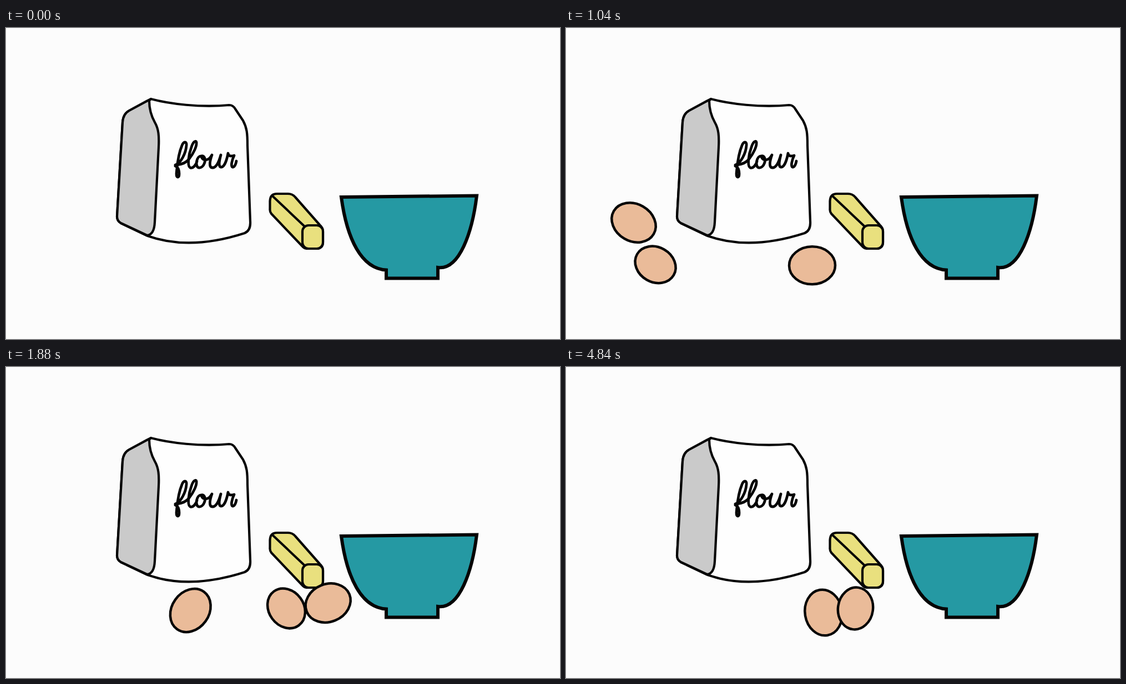
An HTML page that plays this animation: 998x561 px, repeating every 5 s.

```html
<!DOCTYPE html>
<html lang="en">
<head>
<meta charset="utf-8">
<title>Baking ingredients</title>
<style>
  html, body { margin: 0; height: 100%; overflow: hidden; background: #fcfcfc; }
  svg { display: block; width: 100%; height: 100%; }
  path, rect, ellipse { stroke: #050505; stroke-width: 4.2; stroke-linejoin: round; stroke-linecap: round; }
  .line { fill: none; }
  .butter { fill: #e9e07e; }
  .egg { fill: #eabb99; stroke-width: 4.5; }
</style>
</head>
<body>
<svg viewBox="0 0 998 561">
  <g id="bag">
    <path fill="#fefefe" d="M261 128C295 137 350 144 402 139Q409 139 413 146L427 167C434 180 435 190 435 212L440 349Q441 365 430 370C365 391 305 393 255 375L207 352Q200 348 200 340L210 170Q211 155 222 149Z"/>
    <path fill="#cacaca" d="M261 128L222 149Q211 155 210 170L200 340Q200 348 207 352L254 374Q267 373 268 350L275 215C276 195 275 182 268 170Q258 152 258 131Z"/>
    <path class="line" style="stroke-width:4.8" d="M305 247C315 244 324 226 325 212C326 204 320 204 317 212C311 226 308 250 307 263C307 271 312 271 312 263C312 256 310 251 305 249M307 247C318 246 325 243 330 236C338 226 344 213 343 206C342 202 337 205 334 215C329 228 326 249 332 252C337 254 342 247 344 241M353 231C343 229 340 250 347 252C356 254 363 236 355 231C350 229 352 238 360 238C366 237 368 234 371 229C367 240 365 252 372 252C379 252 384 240 387 229C384 240 382 251 388 251C394 250 398 237 400 226C401 231 404 232 411 230C407 238 404 251 409 251C412 250 414 246 415 240"/>
  </g>
  <g id="butter">
    <path class="butter" d="M475.500 312Q476 299 488 299H508Q516 299 521 305L565 355Q571 360 571 367V386Q571 398 559 398H541Q538 398 535 395L478 335Q475 331 475.500 326Z"/>
    <path class="line" d="M480 303L538 358"/>
    <rect class="butter" x="534" y="356" width="37" height="42" rx="11"/>
  </g>
  <path id="bowl" fill="#2599a3" style="stroke-width:6;stroke-linejoin:miter" d="M604 305L848 302.500C840 368 817 437 778 432V451.500H685V436.500C640 434 614 380 604 305Z"/>
  <g id="eggs"></g>
</svg>
<script>
const LOOP = 5000, STEP = 40, SHOW = 40, LEAVE = 4840;
const SPEED = 0.54, RAMP_X = 160, FLOOR = 434, FIRST = 515, LAG = 523;

// Back to front. Each egg slides from its perch to a hold point, rolls to `stop`,
// then is nudged to `rest` during `settle`.
const eggs = [
  { order: 2, rx: 41.5, ry: 33.5, tilt: 30, spin: 1.6, twist: -76, end: LOOP,
    perch: [151, 296], hold: [122, 351], stop: 452, rest: [464, 443], settle: [2240, 2640] },
  { order: 1, rx: 38, ry: 31.5, tilt: 28, spin: 1.64, twist: 17, end: LOOP,
    perch: [110, 316], hold: [111, 333], stop: 505, rest: [521.5, 435.5], settle: [2120, 2600] },
  { order: 0, rx: 41.5, ry: 34, tilt: 5, spin: 1.25, twist: -9, end: LEAVE,
    perch: [119, 345], hold: [119, 345], stop: 605, rest: [587, 425.5], settle: [1560, 2240] },
];

for (const egg of eggs) {
  egg.node = document.createElementNS("http://www.w3.org/2000/svg", "ellipse");
  egg.node.setAttribute("class", "egg");
  egg.node.setAttribute("rx", egg.rx);
  egg.node.setAttribute("ry", egg.ry);
  document.getElementById("eggs").append(egg.node);
}

const mix = (a, b, p) => a + (b - a) * p;
const progress = (t, from, to) => Math.min(1, Math.max(0, (t - from) / (to - from)));
const smooth = p => p * p * (3 - 2 * p);
const backOut = p => 1 + 5 * (p - 1) ** 3 + 4 * (p - 1) ** 2;

function pose({ order, tilt, spin, twist, perch, hold, stop, rest, settle }, t) {
  const since = t - FIRST - LAG * order; // time since passing RAMP_X
  const lead = RAMP_X - hold[0];
  const perched = 1 - smooth(progress(since, -880, -520));
  const slide = (perch[0] - hold[0]) * perched;
  const nudge = backOut(progress(t, ...settle));

  const start = hold[0] + lead * Math.exp(Math.min(0, since) * SPEED / lead);
  const rolled = Math.min(SPEED * Math.max(0, since), stop - RAMP_X) + (rest[0] - stop) * nudge;
  const floor = mix(FLOOR, rest[1], rolled / (rest[0] - RAMP_X));
  const fallen = smooth(progress(since, -400, 80));

  return {
    x: start + slide + rolled,
    y: mix(mix(hold[1], perch[1], perched), floor, fallen),
    angle: tilt + spin * (slide + rolled) + twist * nudge,
  };
}

function draw(now) {
  const t = Math.floor(now % LOOP / STEP) * STEP;
  for (const egg of eggs) {
    const { x, y, angle } = pose(egg, t);
    egg.node.style.display = t >= SHOW && t < egg.end ? "" : "none";
    egg.node.setAttribute("transform", `translate(${x} ${y}) rotate(${angle})`);
  }
}

const start = performance.now();
function tick() {
  draw(performance.now() - start);
  requestAnimationFrame(tick);
}
tick();
</script>
</body>
</html>
```
